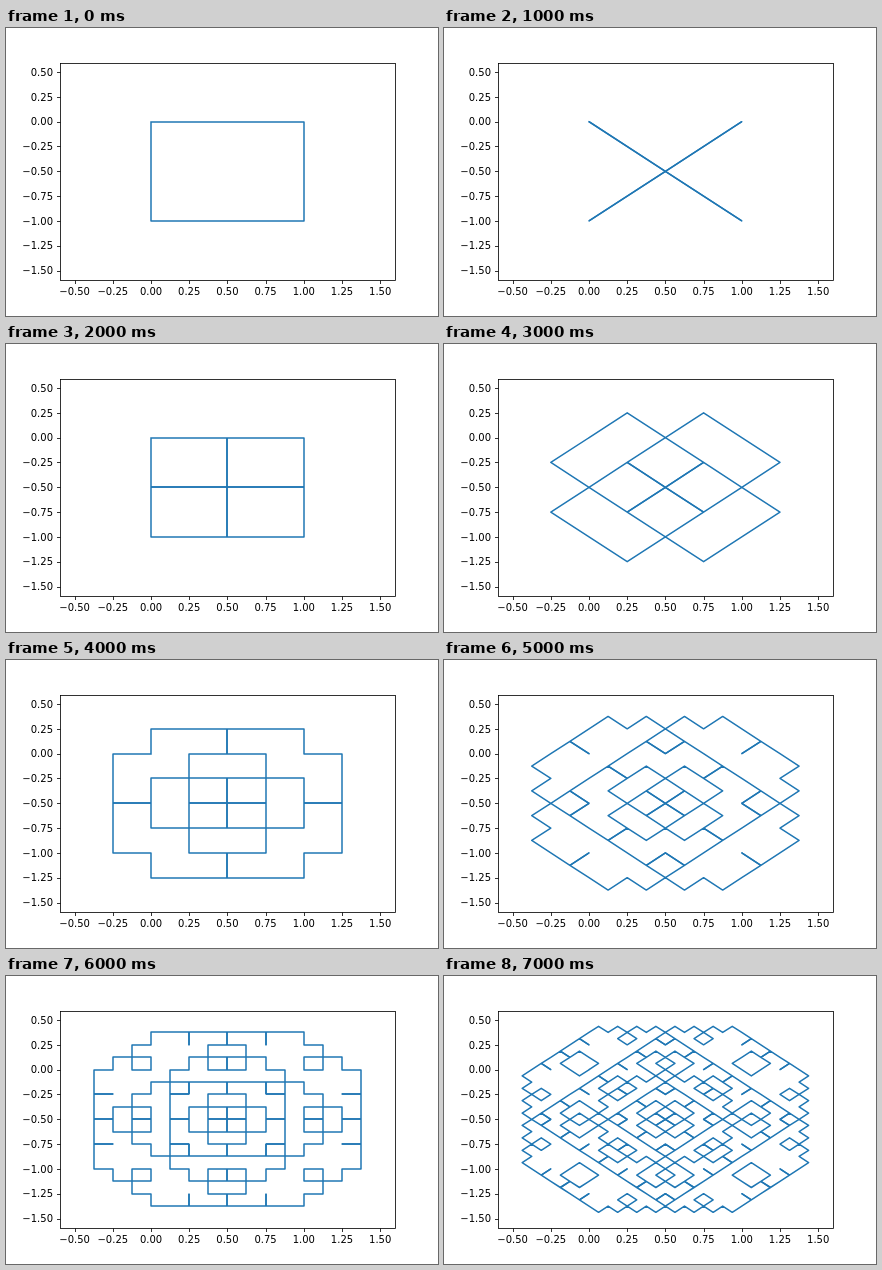
Recreate the animation shown at these times as an HTML page with a canvas. Size 432 by 288 pixels, loop 8 s.

```html
<!DOCTYPE html>
<html>
<head>
<meta charset="utf-8">
<style>
html, body { margin: 0; height: 100%; overflow: hidden; background: #fff; }
canvas { display: block; }
</style>
</head>
<body>
<canvas id="stage" width="432" height="288"></canvas>
<script>
const ctx = document.getElementById('stage').getContext('2d');
const LEVELS = 8, STEP = 1000;
const SPAN = 2.1914; // data units across each axis
const px = x => 221.4 + (x - 0.5) * 334.8 / SPAN;
const py = y => 143.28 - (y + 0.5) * 217.44 / SPAN;

// Levy C curve grown inwards on every side of the unit square
function curve(level) {
  let points = [[0, 0], [1, 0], [1, -1], [0, -1], [0, 0]];
  while (level--) {
    points = points.flatMap(([x, y], i) => {
      if (!i) return [[x, y]];
      const [u, v] = points[i - 1];
      return [[(u + x + y - v) / 2, (v + y - x + u) / 2], [x, y]];
    });
  }
  return points;
}

function line(x0, y0, x1, y1) {
  ctx.beginPath();
  ctx.moveTo(x0, y0);
  ctx.lineTo(x1, y1);
  ctx.stroke();
}

function drawAxes() {
  ctx.strokeStyle = ctx.fillStyle = '#000';
  ctx.lineWidth = 0.8;
  ctx.lineJoin = 'miter';
  ctx.lineCap = 'butt';
  ctx.font = '10px "DejaVu Sans", sans-serif';
  ctx.strokeRect(54.5, 35.5, 335, 217);
  const label = v => v.toFixed(2).replace('-', '\u2212');
  for (let v = -0.5; v <= 1.5; v += 0.25) {
    const x = Math.round(px(v)) + 0.5;
    line(x, 252.5, x, 256);
    ctx.textAlign = 'center';
    ctx.fillText(label(v), px(v), 267);
  }
  for (let v = -1.5; v <= 0.5; v += 0.25) {
    const y = Math.round(py(v)) + 0.5;
    line(51, y, 54.5, y);
    ctx.textAlign = 'right';
    ctx.fillText(label(v), 47, Math.round(py(v) + 3.8));
  }
}

function drawCurve(level) {
  // Axis-parallel levels sit on whole pixels
  const snap = level % 2 ? v => v : Math.round;
  const points = curve(level);
  const seen = new Set(), once = new Path2D(), again = new Path2D();
  points.forEach(([x, y], i) => {
    const X = snap(px(x)), Y = snap(py(y));
    once.lineTo(X, Y);
    if (!i) return;
    const [u, v] = points[i - 1], key = `${u + x},${v + y}`;
    if (seen.has(key)) {
      again.moveTo(snap(px(u)), snap(py(v)));
      again.lineTo(X, Y);
    }
    seen.add(key);
  });
  ctx.strokeStyle = '#1f77b4';
  ctx.lineWidth = 1.5;
  ctx.lineJoin = 'round';
  ctx.lineCap = 'square';
  ctx.stroke(once);
  ctx.lineCap = 'butt';
  ctx.stroke(again); // overlapping edges look heavier
}

let shown = -1;
const start = performance.now();
function frame() {
  const level = Math.floor((performance.now() - start) / STEP) % LEVELS;
  if (level !== shown) {
    shown = level;
    ctx.fillStyle = '#fff';
    ctx.fillRect(0, 0, 432, 288);
    drawCurve(level);
    drawAxes();
  }
  requestAnimationFrame(frame);
}
frame();
</script>
</body>
</html>
```
